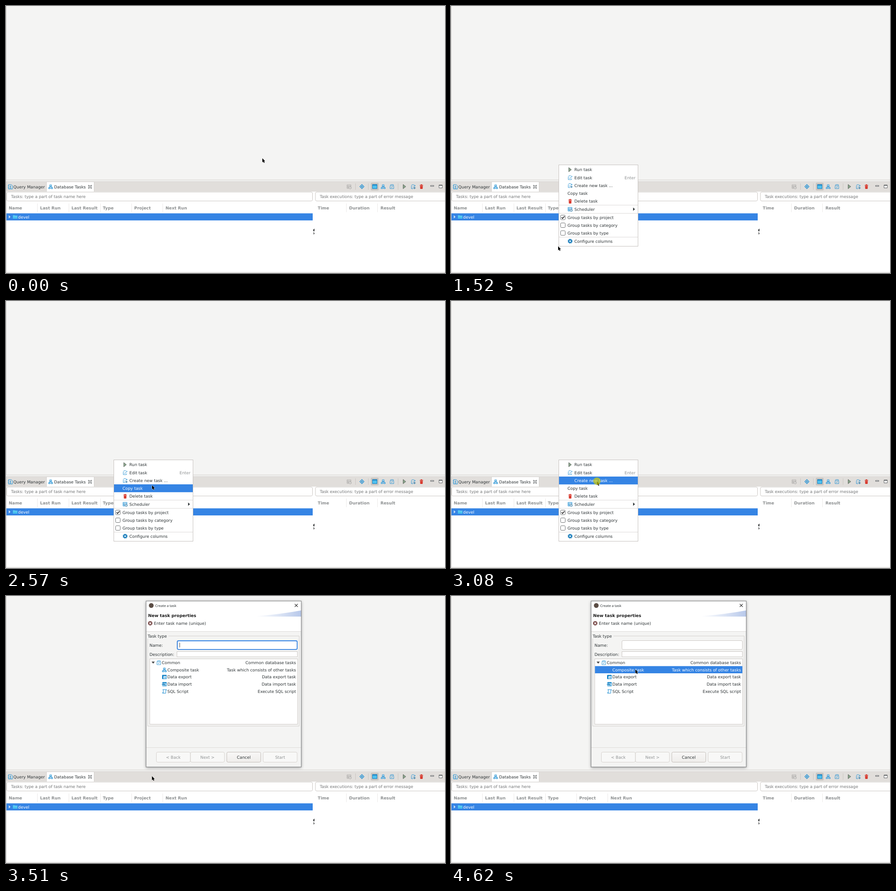
An HTML page for the animation above (5.59 s loop, 959 px wide and 584 px high).

```html
<!DOCTYPE html>
<html lang="en">
<head>
<meta charset="utf-8">
<title>Create a task</title>
<style>
  html, body { margin: 0; width: 100%; height: 100%; overflow: hidden; background: #f4f4f3; }
  svg { display: block; }
  text { font: 8.92px "DejaVu Sans", sans-serif; fill: #2e3436; text-rendering: geometricPrecision; white-space: pre; }
  .bold { font-weight: bold; font-size: 9.2px; fill: #1c1c1c; }
  .head text { font-weight: bold; font-size: 9.05px; fill: #8e9192; }
  .dim { fill: #8f9293; }
  .hint { fill: #747677; }
  .end { text-anchor: end; }
  .mid { text-anchor: middle; }
  .title { font: 7.55px "Noto Sans", sans-serif; }
  .line { fill: none; stroke: #d3d0cd; }
  .field { fill: #fff; stroke: #cbc7c3; }
  .blue { fill: none; stroke: #2491d3; }
  .bar { fill: #3584e4; opacity: 0; }
  .box { fill: #fff; stroke: #6e7173; }
  .tick { fill: none; stroke: #222; stroke-width: 1.6; }
  .hot .bar { opacity: 1; }
  .hot text { fill: #fff; }
  .hot use { display: none; }
  .hot .box { fill: none; stroke: #dbe9fb; }
  .hot .tick { stroke: #fff; }
  .off { display: none; }
</style>
</head>
<body>
<svg width="959" height="584" viewBox="0 0 959 584">
  <defs>
    <linearGradient id="swoosh"><stop offset="0" stop-color="#fff"/><stop offset=".5" stop-color="#dde5f5"/><stop offset="1" stop-color="#b7c8ea"/></linearGradient>
    <linearGradient id="face" x2="0" y2="1"><stop offset="0" stop-color="#f8f7f6"/><stop offset="1" stop-color="#efedeb"/></linearGradient>
    <filter id="shadow" x="-10%" y="-10%" width="120%" height="120%"><feDropShadow dx="0" dy="1.5" stdDeviation="3" flood-opacity=".4"/></filter>
    <g id="tree">
      <path class="blue" d="M5.5 4V6M2.5 8V6H8.5V8"/>
      <path d="M3.5 1.5h4v3h-4zM1 7.5h3.5v2.5H1zM6.5 7.5H10v2.5H6.5z" fill="#cfeaf8" stroke="#2491d3"/>
    </g>
    <g id="task">
      <path class="blue" d="M1.5 4.5V10H9.5V4.5M1.5 3.5L3 1.2H8.5L9.5 3.5Z" stroke-width=".9"/>
      <path class="blue" d="M3.5 6.5l1.5 1.3L7.5 5.3"/>
    </g>
    <g id="edit">
      <path class="blue" d="M1.5 4V10H8.5V7.5M1.5 3.5L3 1.5H7" stroke-width=".9"/>
      <path class="blue" d="M3.5 6l1.5 1.5L10 2.5M8 1.5l2 2"/>
    </g>
    <g id="new">
      <path class="blue" d="M1.5 4V10H6M1.5 3.5L3 1.5H7.5M3.5 6l1.3 1.3L7 5" stroke-width=".9"/>
      <path d="M8.5 6v5M6 8.5h5" stroke="#18689b"/>
      <path class="blue" d="M7 3.5h3M8.5 2l1.7 1.5L8.5 5"/>
    </g>
    <path id="run" d="M2.5 .8L8.3 5.5 2.5 10.2Z" fill="#8aa58c" stroke="#5c655d" stroke-width=".9"/>
    <g id="trash" fill="#d3271b">
      <path d="M1.8 2h7.4v1.3H1.8zM4 .8h3V2H4zM2.5 4h6l-.4 6.5H2.9z"/>
      <path d="M4.3 5v4.5M6.7 5v4.5" stroke="#ee8177" stroke-width=".6"/>
    </g>
    <g id="clock">
      <path class="blue" d="M1 1.5H9.5V5M1 1.5V9.5H5M1 4H9.5M3.5 4V9.5M1 6.7H5"/>
      <circle cx="8" cy="8" r="2.5" fill="#fff" stroke="#18689b"/>
      <path d="M8 6.6V8H9.2" fill="none" stroke="#18689b" stroke-width=".7"/>
    </g>
    <g id="gear">
      <circle cx="5.5" cy="5.5" r="4.2" fill="none" stroke="#2282bd" stroke-width="2" stroke-dasharray="2.2 1.1"/>
      <circle cx="5.5" cy="5.5" r="2.8" fill="none" stroke="#2282bd" stroke-width="2.2"/>
    </g>
    <g id="window"><path d="M.5 1h10v9H.5z" fill="#4fc0ee" stroke="#1a82c2"/><path d="M.5 2h10" stroke="#1a82c2" stroke-width="2"/></g>
    <g id="export"><path d="M1 1.5h9v8H1z" fill="#fff" stroke="#2491d3"/><path d="M1 2.3h9M2.3 2v7.5" stroke="#1583c6" stroke-width="2.4"/><path class="blue" d="M5 6h4M5 8h4"/></g>
    <g id="import"><path d="M1.5 1.5H10v8H1.5z" fill="#bfe4f7" stroke="#2491d3"/><path d="M1.5 2.3H10" stroke="#1583c6" stroke-width="2"/><path d="M0 6h5M3.5 4l2 2-2 2M7 5v4" fill="none" stroke="#1377b5" stroke-width="1.2"/></g>
    <path id="script" class="blue" d="M3 9V1.5H10V3H8.5V9.5H1.5V8H3M3 1.5H1.5" />
  </defs>

  <rect width="959" height="584" fill="#f4f4f3"/>
  <path class="line" d="M.5 0V380.5H959"/>
  <rect y="384" width="959" height="22" fill="#e1dedb"/>
  <rect y="406" width="959" height="176" fill="#fff"/>
  <path class="line" d="M0 384H959M.5 384V582.5H959"/>
  <path d="M89 384.5H192V406H89Z" fill="#fff"/>
  <path class="line" d="M88.5 406V384.5H192.5V406"/>

  <g transform="translate(4 390)">
    <path class="blue" d="M1.5 .8H7.5L10 3.2V10.3H1.5Z"/>
    <circle cx="5.5" cy="4.6" r="1.3" fill="#2491d3"/><path d="M3.2 8.8Q5.5 4.5 7.8 8.8Z" fill="#2491d3"/><path class="blue" d="M0 3.5H2M0 7.5H2"/>
  </g>
  <text x="16" y="398.5">Query Manager</text>
  <use href="#tree" x="92" y="389.7"/>
  <text x="105" y="398.5">Database Tasks</text>
  <path d="M180 392.3l1.3-.3 2.2 2.3 2.2-2.3 1.3.3v1.2l-2.1 2 2.1 2v1.2l-1.3.3-2.2-2.3-2.2 2.3-1.3-.3v-1.2l2.1-2-2.1-2z" fill="#fff" stroke="#2e3436" stroke-width=".9"/>

  <use href="#clock" x="744" y="389.5" style="filter:grayscale(1);opacity:.5"/>
  <g transform="translate(777.5 395)">
    <path class="blue" d="M0-4.5L4.5 0 0 4.5-4.5 0Z" stroke-width="1.3"/><path class="blue" d="M-2-2L2 2M2-2L-2 2"/><circle r="1.5" fill="#2491d3"/>
  </g>
  <rect x="797" y="386.5" width="17" height="17" rx="2" fill="#c9c5c1"/>
  <use href="#window" x="800" y="389.5"/>
  <use href="#tree" x="818.5" y="389.5"/>
  <use href="#task" x="837.5" y="389.5"/>
  <use href="#run" x="865" y="389.5"/>
  <use href="#new" x="884" y="389.5"/>
  <use href="#trash" x="902" y="389.5"/>
  <path class="line" d="M763.5 388V402M791.5 388V402M856.5 388V402" style="stroke:#cbc7c3"/>
  <path d="M927.5 392.5h7v2h-7zM946 391.5h7v6.5h-7zM946 392.5h7" fill="#fff" stroke="#4f5254" stroke-width=".9"/>

  <rect class="field" x="1.5" y="407" width="668" height="19.5" rx="3"/>
  <rect class="field" x="676" y="407" width="300" height="19.5" rx="3"/>
  <text class="hint" x="11" y="420">Tasks: type a part of task name here</text>
  <text class="hint" x="685.5" y="420">Task executions: type a part of error message</text>
  <g class="head">
    <text x="6" y="444.5">Name</text><text x="74.5" y="444.5">Last Run</text><text x="143" y="444.5">Last Result</text>
    <text x="211.5" y="444.5">Type</text><text x="280" y="444.5">Project</text><text x="348.5" y="444.5">Next Run</text>
    <text x="681" y="444.5">Time</text><text x="749.5" y="444.5">Duration</text><text x="818" y="444.5">Result</text>
  </g>
  <path class="line" d="M68.5 432V451M137.5 432V451M206.5 432V451M274.5 432V451M342.5 432V451M743.5 432V451M811.5 432V451" style="stroke:#ebe9e8"/>
  <rect x="1" y="453.5" width="669" height="15.5" fill="#3584e4"/>
  <path d="M6 457.8L10 461.2 6 464.6Z" fill="#c9dff8"/>
  <path d="M15 457.5h4l1 1h5v6.5H15z" fill="#46c1ee"/><path d="M15.5 460h9" stroke="#8fdcf7" stroke-width=".8"/>
  <text x="26.5" y="464.5" style="fill:#fff">devel</text>
  <path d="M674 487q-3 1-3.2 4l1.4 2.2 1.8-1zM671 495.3q2.8 0 3 2.4l-2.6 3.4q1-2 .6-3.3z" fill="#4a4c4d"/>

  <g id="menu" class="off">
    <rect x="235.5" y="347.5" width="173" height="178" fill="#fff" stroke="#c6c2bf"/>
    <path class="line" d="M236 435.5H408M236 453.5H408M236 505.5H408" style="stroke:#dddad8"/>
    <g id="rows"></g>
  </g>

  <g id="dialog" class="off">
    <rect x="306" y="11" width="339" height="363" fill="#f4f4f3" filter="url(#shadow)"/>
    <rect x="306" y="11" width="339" height="66.5" fill="#fff"/>
    <path class="line" d="M306 77.5H645M306 331.5H645" style="stroke:#dedbd9"/>
    <path d="M546 44Q600 40 645 31.5V45H546Z" fill="url(#swoosh)"/>
    <rect x="306" y="11" width="339" height="363" fill="none" stroke="#77797a"/>
    <circle cx="317.3" cy="20.7" r="5.2" fill="#5b4d45"/>
    <text class="title" x="326" y="23.6">Create a task</text>
    <path d="M630.8 17.3l6.6 6.6M637.4 17.3l-6.6 6.6" stroke="#222" stroke-width="1.1"/>
    <text class="bold" x="310.5" y="46">New task properties</text>
    <circle cx="315" cy="59.7" r="4.8" fill="#7b4c4b"/>
    <path d="M313 57.7l4 4M317 57.7l-4 4" stroke="#fff" stroke-width="1.3"/>
    <text x="323" y="63">Enter task name (unique)</text>

    <path class="line" d="M309.5 93V284.5H640.5V87.5H355"/>
    <text x="309.5" y="90.5">Task type</text>
    <text x="313.5" y="110.5">Name:</text>
    <rect class="field" x="373.5" y="97.5" width="263" height="19.5" rx="2.5"/>
    <rect id="focus" x="374.3" y="98" width="261.7" height="18.8" rx="2.5" fill="#fff" stroke="#3584e4" stroke-width="1.8"/>
    <path id="caret" d="M379.5 102V112.5" stroke="#333" stroke-width=".9"/>
    <text x="313.5" y="130.5">Description:</text>
    <rect class="field" x="373.5" y="121.5" width="263" height="11.5"/>
    <rect class="field" x="314" y="137.5" width="323" height="143"/>
    <path d="M318 143.5h7l-3.5 4.5z" fill="#444"/>
    <g id="types"></g>
    <g id="buttons"></g>
  </g>

  <path id="cursor" d="M0 0V9L2 7.2 3.4 10.3 5 9.6 3.6 6.6H6.2Z" stroke="#fff" stroke-width=".9" paint-order="stroke"/>
  <circle id="click" class="off" r="8" fill="#d3d000" opacity=".66"/>
</svg>
<script>
const LOOP = 5590;
const $ = id => document.getElementById(id);
const use = (icon, x, y) => icon ? `<use href="#${icon}" x="${x}" y="${y}"/>` : '';
const show = (id, on) => $(id).classList.toggle('off', !on);

// label, centre y, icon
const items = [
  ['Run task', 358, 'run'], ['Edit task', 375.3, 'edit'], ['Create new task ...', 392.6, 'new'],
  ['Copy task', 409.6], ['Delete task', 426.9, 'trash'], ['Scheduler', 444.4, 'clock'],
  ['Group tasks by project', 462.4], ['Group tasks by category', 479.5], ['Group tasks by type', 496.6],
  ['Configure columns', 514.4, 'gear']
];
const extra = (label, y) => {
  if (label === 'Edit task') return `<text class="dim end" x="403" y="${y + 3.4}">Enter</text>`;
  if (label === 'Scheduler') return `<path d="M397.8 ${y - 3.6}l4 3.6-4 3.6z" fill="#2e3436"/>`;
  if (!label.startsWith('Group')) return '';
  const box = `<rect class="box" x="239.5" y="${y - 5}" width="10" height="10" rx="1.8"/>`;
  return label.endsWith('project') ? box + `<path class="tick" d="M241.6 ${y}l2.2 2.3 4.2-5"/>` : box;
};
$('rows').innerHTML = items.map(([label, y, icon]) =>
  `<g><rect class="bar" x="236" y="${y - 8.6}" width="172" height="17.2"/>${use(icon, 254.7, y - 5.5)}
  <text x="${icon ? 269.5 : 254.5}" y="${y + 3.4}">${label}</text>${extra(label, y)}</g>`).join('');

const types = [
  ['Common', 'Common database tasks', 'task'], ['Composite task', 'Task which consists of other tasks', 'tree'],
  ['Data export', 'Data export task', 'export'], ['Data import', 'Data import task', 'import'],
  ['SQL Script', 'Execute SQL script', 'script']
];
$('types').innerHTML = types.map(([name, note, icon], i) => {
  const x = i ? 340.5 : 328.3, y = 145.5 + i * 15.75;
  return `<g><rect class="bar" x="314.5" y="${y - 7.9}" width="322" height="15.7"/>${use(icon, x, y - 5.3)}
    <text x="${x + 12}" y="${y + 3.3}">${name}</text><text class="end" x="633.5" y="${y + 3.3}">${note}</text></g>`;
}).join('');

$('buttons').innerHTML = [['&lt; Back', 328.5], ['Next &gt;', 403], ['Cancel', 482.3], ['Start', 561.8]].map(([label, x]) => {
  const on = label === 'Cancel';
  return `<rect x="${x}" y="341.5" width="74.2" height="22" rx="3" fill="${on ? 'url(#face)' : '#f8f8f7'}" stroke="${on ? '#c3bdb8' : '#d6d2ce'}"/>
    <text class="mid ${on ? '' : 'dim'}" x="${x + 37}" y="355.5">${label}</text>`;
}).join('');

// start, end, steps, target x, target y
const moves = [
  [360, 560, 4, 505, 366], [560, 760, 4, 320, 480], [760, 960, 4, 235, 526], [960, 1160, 2, 234, 525.5],
  [1750, 2026, 6, 287, 466], [2026, 2306, 5, 313, 437], [2306, 2614, 7, 319, 403], [2850, 3000, 3, 318.8, 394],
  [3640, 3790, 3, 368, 294], [3790, 4090, 6, 394, 190], [4090, 4390, 6, 402.7, 160.5]
];
function cursorAt(t) {
  let x = 560, y = 333;
  for (const [start, end, n, tx, ty] of moves) {
    if (t < start) break;
    const k = Math.min(1, (Math.floor((t - start) / (end - start) * n) + 1) / n);
    x += (tx - x) * k;
    y += (ty - y) * k;
  }
  return [x, y];
}

const rows = [...$('rows').children];
const composite = $('types').children[1];
const clicks = [[1390, 1520], [3080, 3230], [4390, 4620]];
function draw(now) {
  const t = now % LOOP;
  const [x, y] = cursorAt(t);
  const at = `translate(${x} ${y})`;
  $('cursor').setAttribute('transform', at);
  $('click').setAttribute('transform', at);
  show('click', clicks.some(([a, b]) => t >= a && t < b));
  show('menu', t >= 1450 && t < 3230);
  show('dialog', t >= 3330);
  show('focus', t < 4440);
  show('caret', t < 4240);
  rows.forEach((row, i) => row.classList.toggle('hot', x > 235 && Math.abs(y - items[i][1]) < 8.6));
  composite.classList.toggle('hot', t >= 4440);
}

let begin;
function tick(now) {
  begin ??= now;
  draw(now - begin);
  requestAnimationFrame(tick);
}
draw(0);
requestAnimationFrame(tick);
</script>
</body>
</html>
```
